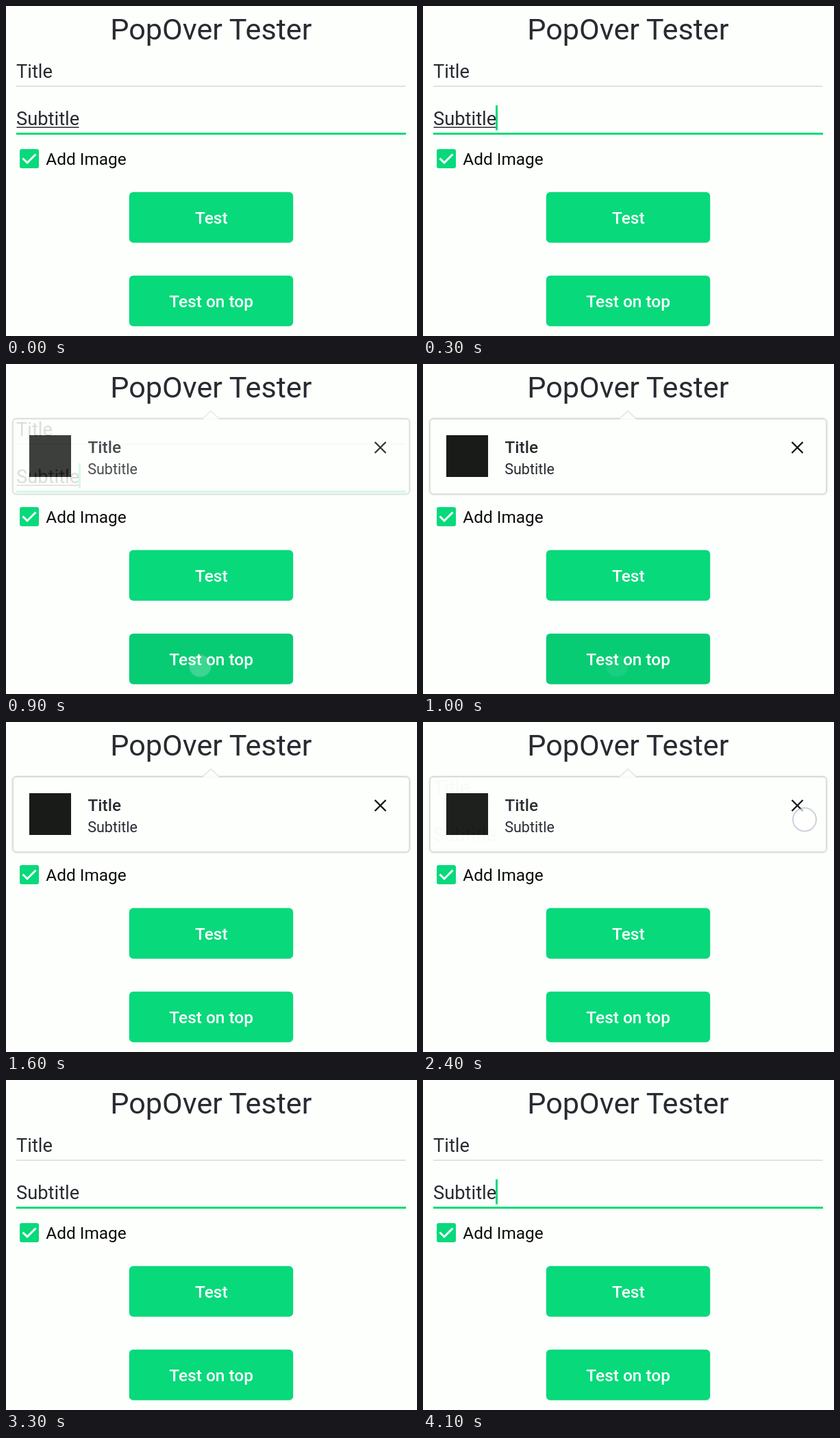
An HTML page that plays this animation: 600x482 px, repeating every 4.2 s.

```html
<!DOCTYPE html>
<html lang="en">
<head>
<meta charset="utf-8">
<title>PopOver Tester</title>
<style>
  html, body { margin: 0; width: 100%; height: 100%; overflow: hidden; background: #fdfffc; }
  svg { display: block; width: 600px; height: 482px; font-family: Roboto, sans-serif; fill: #292a31; }
  .heading { font-size: 43.2px; text-anchor: middle; }
  .field { font-size: 27.3px; }
  .label { font-size: 24.4px; }
  .small { font-size: 21.5px; }
  .bold { font-weight: 500; }
  .button { fill: #fff; text-anchor: middle; }
  .green { fill: #08d97b; }
  .card { fill: #fdfffc; stroke: #dadcda; stroke-width: 1.8; }
  .line { fill: none; stroke-linecap: butt; }
  .touch { fill: #fff; fill-opacity: .65; stroke: #7878a8; stroke-opacity: .36; stroke-width: 2; }
</style>
</head>
<body>
<svg viewBox="0 0 600 482">
  <defs>
    <clipPath id="buttonClip"><rect x="180" y="394" width="239" height="73.5" rx="6"/></clipPath>
    <filter id="shadow" x="-5%" y="-15%" width="110%" height="130%">
      <feDropShadow dx="0" dy="0.2" stdDeviation="1" flood-color="#000" flood-opacity=".16"/>
    </filter>
  </defs>

  <text class="heading" x="299.3" y="48.8">PopOver Tester</text>

  <text class="field" x="15" y="105.3">Title</text>
  <rect x="15" y="116.5" width="568.5" height="1.5" fill="#d8dad8"/>
  <text class="field" x="15" y="174">Subtitle</text>
  <rect id="underline" x="15.5" y="176.5" width="91" height="1.5"/>
  <rect class="green" x="15" y="185" width="569" height="3"/>
  <rect id="cursor" class="green" x="106" y="145" width="3" height="36.5"/>

  <rect class="green" x="20" y="209" width="28" height="28" rx="3"/>
  <path class="line" d="M24.5 222.5L31 229L43.5 216.5" stroke="#fff" stroke-width="3"/>
  <text class="label" x="58.3" y="232" fill="#0c0c0c">Add Image</text>

  <rect class="green" x="179.8" y="271.8" width="239.4" height="73.9" rx="6"/>
  <text class="label bold button" x="299.8" y="317.8">Test</text>
  <rect class="green" x="179.8" y="393.8" width="239.4" height="73.9" rx="6"/>
  <g clip-path="url(#buttonClip)"><circle id="ripple" cx="284" cy="441" fill="#000"/></g>
  <text class="label bold button" x="299.6" y="440">Test on top</text>

  <g id="popover">
    <rect class="card" x="10" y="80" width="579" height="109.8" rx="5" filter="url(#shadow)"/>
    <path class="card" d="M286 80.8L299 68.5L312 80.8" stroke-opacity=".65"/>
    <rect x="34" y="104" width="61" height="61" fill="#191b18"/>
    <text class="label bold" x="119.5" y="130">Title</text>
    <text class="small" x="119.2" y="160.5">Subtitle</text>
    <path class="line" d="M538.5 114L554.5 130M554.5 114L538.5 130" stroke="#111" stroke-width="2.3"/>
  </g>

  <circle id="openTouch" class="touch" cx="283.5" cy="441" r="16.5"/>
  <circle id="closeTouch" class="touch" cx="557" cy="142.5" r="17"/>
</svg>

<script>
  const LOOP = 4200, STEP = 100;
  const $ = id => document.getElementById(id);
  const clamp = v => Math.min(1, Math.max(0, v));
  const ease = (t, start, length) => (1 - Math.cos(Math.PI * clamp((t - start) / length))) / 2;
  const fade = (id, alpha) => $(id).setAttribute('opacity', alpha);

  function draw(t) {
    const opened = ease(t, 590, 420), closed = ease(t, 2360, 425);
    fade('popover', opened - closed);
    fade('underline', t < 1100 ? 1 : 0);

    const cursorOn = (t >= 300 && t < 1100) || (t >= 2800 && t < 3300) || t >= 3800;
    fade('cursor', cursorOn ? 1 : 0);

    fade('openTouch', t >= 600 ? clamp((1040 - t) / 440) : 0);
    fade('closeTouch', t >= 2400 ? 1 - closed : 0);

    $('ripple').setAttribute('r', 240 * clamp((t - 600) / 500));
    fade('ripple', 0.06 * clamp((1400 - t) / 300));
  }

  function tick() {
    draw(Math.floor(performance.now() % LOOP / STEP) * STEP);
    requestAnimationFrame(tick);
  }
  tick();
</script>
</body>
</html>
```
